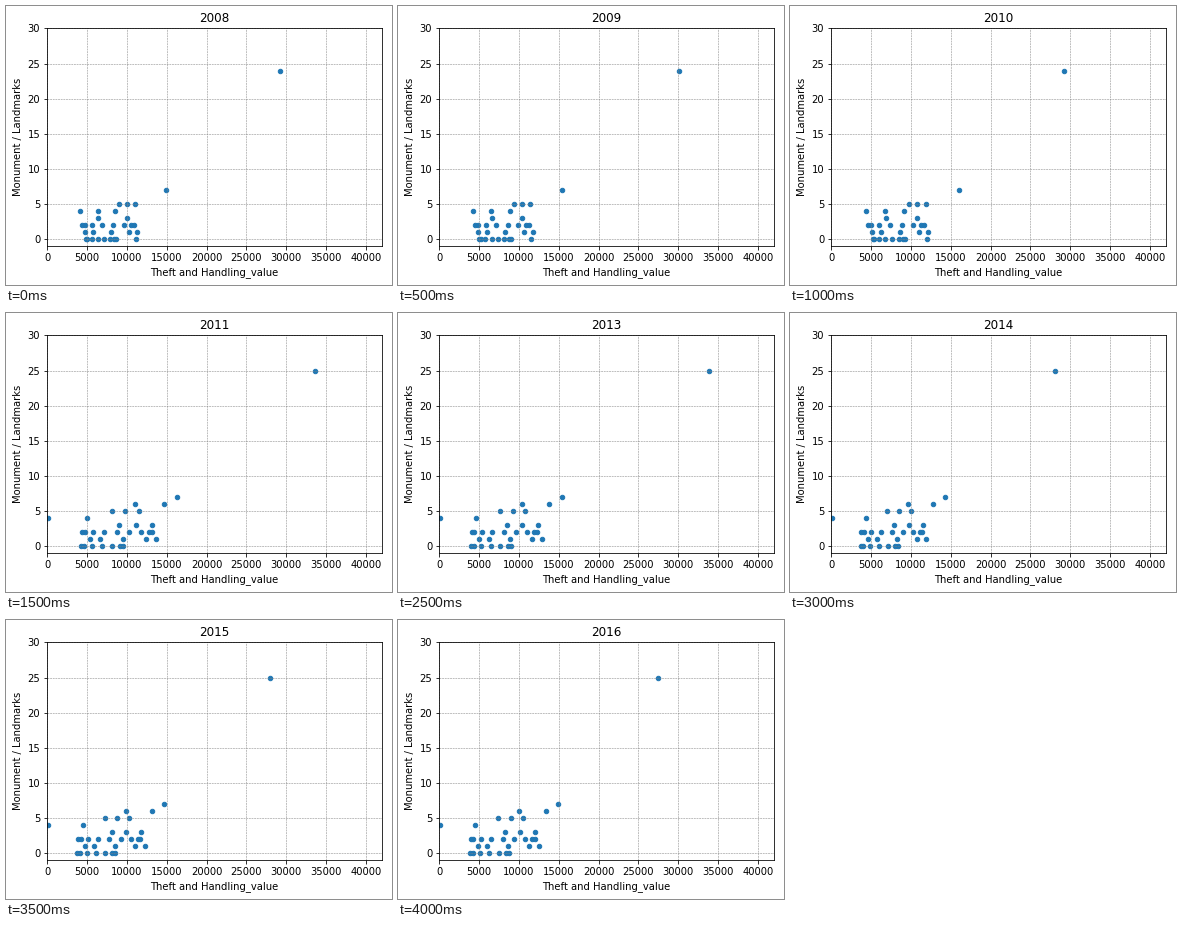
A matplotlib script for the animation above (4.5 s loop, 386 by 279 pixels).

```python
import numpy as np
import matplotlib.pyplot as plt
from matplotlib.animation import FuncAnimation

W, H, DPI = 386, 279, 72
FIRST_YEAR, STEP_MS = 2008, 500
RECOUNT_YEAR = 2011

plt.rcParams["font.family"] = "DejaVu Sans"

# Rows of boroughs: landmarks, how many, lowest and highest thefts (thousands)
EARLY = [(0, 8, 5.2, 9.3), (0, 1, 12.0, 12.0), (1, 5, 5.1, 12.15),
         (2, 8, 4.65, 11.7), (3, 2, 6.9, 10.8), (4, 3, 4.4, 9.2),
         (5, 3, 9.75, 11.85), (7, 1, 16.0, 16.0)]
LATE = [(0, 7, 4.3, 9.7), (1, 5, 5.4, 13.9), (2, 9, 4.4, 13.3),
        (3, 3, 9.2, 13.4), (4, 2, 0.15, 5.05), (5, 3, 8.2, 11.7),
        (6, 2, 11.2, 14.9), (7, 1, 16.6, 16.6)]

# Overall level of thefts, and the thefts of the busiest borough, per year
LEVEL = [0.93, 0.965, 1, 0.985, 1, 0.925, 0.86, 0.88, 0.9]
BUSIEST = [29.2, 30.05, 29.2, 33.55, 38.1, 33.9, 28.1, 28.0, 27.5]


def spread(n, low, high):
    """n values from low to high, crowded towards both ends."""
    u = np.linspace(0, 1, n)
    return low + (high - low) * u * u * (3 - 2 * u)


def boroughs(i):
    """Thefts and landmarks of all boroughs in one year."""
    late = FIRST_YEAR + i >= RECOUNT_YEAR
    points = [(BUSIEST[i], 25 if late else 24)]
    for count, n, low, high in LATE if late else EARLY:
        points += [(x * LEVEL[i], count) for x in spread(n, low, high)]
    return np.array(points) * (1000, 1)


fig = plt.figure(figsize=((W + 1e-6) / DPI, (H + 1e-6) / DPI), dpi=DPI,
                 facecolor="white")
ax = fig.add_axes([41.14 / W, 39.1 / H, 334.8 / W, 217.44 / H])
ax.set(xlim=(0, 42000), ylim=(-1, 30),
       xlabel="Theft and Handling_value", ylabel="Monument / Landmarks")
ax.set_xticks(range(0, 40001, 5000))
ax.set_yticks(range(0, 31, 5))
ax.grid(color="grey", linestyle="--", linewidth=0.5)
dots = ax.scatter([], [], s=20, color="tab:blue")
title = ax.set_title("")


def draw(i):
    dots.set_offsets(boroughs(i))
    title.set_text(str(FIRST_YEAR + i))
    return dots, title


anim = FuncAnimation(fig, draw, frames=len(LEVEL), interval=STEP_MS,
                     init_func=lambda: draw(0), repeat=True, repeat_delay=0)
plt.show()
```
